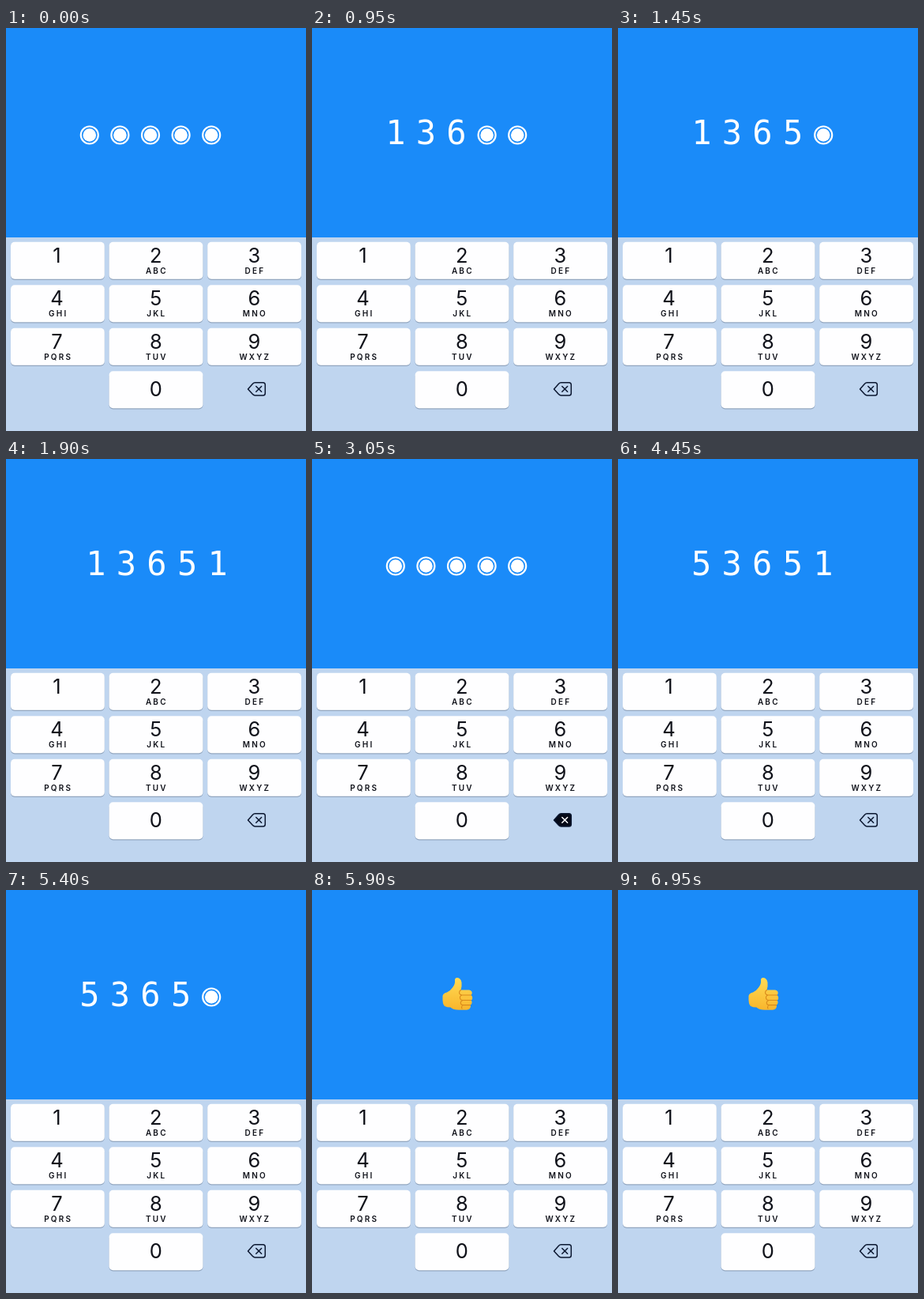
Recreate the animation shown at these times as an HTML page. Size 380 by 510 pixels, loop 7000 ms.

```html
<!DOCTYPE html>
<html lang="en">
<head>
<meta charset="utf-8">
<style>
html, body { margin: 0; width: 100%; height: 100%; overflow: hidden; background: #1a8bf9; }
svg { display: block; }
text { text-anchor: middle; }
.key { font: 25.5px Inter, "Liberation Sans", sans-serif; fill: #10121a; }
.sub { font: 600 10px Inter, "Liberation Sans", sans-serif; letter-spacing: 2.2px; fill: #10121a; }
.code text { font: 42px "DejaVu Sans Mono", monospace; fill: #fff; }
</style>
</head>
<body>
<svg width="380" height="510" viewBox="0 0 380 510">
  <defs>
    <linearGradient id="skin" x2="0" y2="1">
      <stop offset="0" stop-color="#ffdb55"/>
      <stop offset="1" stop-color="#f8b52c"/>
    </linearGradient>
  </defs>
  <rect width="380" height="510" fill="#1a8bf9"/>
  <g class="code" id="code"></g>
  <g id="thumb">
    <path fill="url(#skin)" d="M165.5 134 Q166 130.500 171 129.500 Q175 128 178 123.500 Q181.500 119.500 181 114 Q181 111 184 111 Q188.500 111.500 189.500 117 Q190 122 188.500 126.500 L199 126.500 Q202.500 127 202.700 130 Q202.700 132 201.500 133 Q203.500 134.500 203.200 137 Q203 139 201.500 139.500 Q203 141 202.500 143 Q202 145 200.500 145.500 Q201.500 147 200.500 149 Q199.500 151.500 196 151.700 L186 151.700 Q179 151.700 175.500 148.500 Q171 148.500 168 147 Q165 145 165.500 134Z"/>
    <path fill="none" stroke="#d98a1c" stroke-width="1.1" stroke-linecap="round" d="M188.500 126.500 Q186.500 128 186.500 130 Q187 132.800 190 133 H201.500 M190 133 Q187 134 187.500 137 Q188 139.500 191 139.500 H201.500 M191 139.500 Q187.500 141 188.500 144 Q189 145.600 191.500 145.600 H200.500 M191.500 145.600 Q188.500 147.500 190 150"/>
  </g>
  <rect y="265" width="380" height="245" fill="#bfd5ef"/>
  <g id="pad"></g>
  <g id="del" stroke="#0b1730" stroke-width="1.5" stroke-linejoin="round" stroke-linecap="round">
    <path d="M306.500 457 L312.500 450.200 Q313.800 448.800 315.500 448.800 H325.500 Q328.300 448.800 328.300 451.600 V462.200 Q328.300 465 325.500 465 H315.500 Q313.800 465 312.500 463.600Z"/>
    <path id="cross" d="M316.800 453.500 l6.800 6.800 m0 -6.800 l-6.800 6.800"/>
  </g>
</svg>
<script>
const $ = id => document.getElementById(id);
const LOOP = 7000, SHAKE = 400, SUCCESS = 5750;

// [key, pressed, released]; digits land on release, deletion on press
const taps = [
  ["1", 50, 200], ["3", 600, 700], ["6", 850, 950], ["5", 1100, 1200], ["1", 1500, 1650],
  ["<", 2200, 2300], ["<", 2350, 2450], ["<", 2500, 2600], ["<", 2650, 2750], ["<", 2950, 3100],
  ["5", 3200, 3300], ["3", 3450, 3550], ["6", 3650, 3750], ["5", 3850, 4000], ["1", 4200, 4350],
  ["<", 5000, 5100], ["9", 5550, 5650]
];
const shakes = [1650, 4350];

const letters = ["", "ABC", "DEF", "GHI", "JKL", "MNO", "PQRS", "TUV", "WXYZ"];
const caps = {};
function addKey(label, col, row, sub = "") {
  const x = 6 + col * 124.6, y = 270.7 + row * 54.5, mid = x + 59.2;
  $("pad").insertAdjacentHTML("beforeend",
    `<rect x="${x}" y="${y + 1.2}" width="118.800" height="47" rx="5" fill="#92a6bf"/>
     <rect id="k${label}" x="${x}" y="${y}" width="118.800" height="47" rx="5"/>
     <text class="key" x="${mid - (col ? 0 : 0.8)}" y="${y + 25.8}">${label}</text>
     <text class="sub" x="${mid + 1}" y="${y + 39.8}">${sub}</text>`);
  caps[label] = $("k" + label);
}
letters.forEach((sub, i) => addKey(String(i + 1), i % 3, Math.floor(i / 3), sub));
addKey("0", 1, 3);
// the bottom digit sits in the middle of its key
caps["0"].nextElementSibling.setAttribute("y", 466.3);

const slots = [0, 1, 2, 3, 4].map(i => {
  const g = document.createElementNS("http://www.w3.org/2000/svg", "g");
  g.setAttribute("transform", `translate(${105.8 + i * 38.6} 0)`);
  g.innerHTML = `<text y="147"></text><g><circle cy="135.500" r="11" fill="none"
    stroke="#fff" stroke-width="2.200"/><circle cy="135.500" r="8.300" fill="#fff"/></g>`;
  $("code").append(g);
  return g;
});

const show = (el, on) => el.setAttribute("visibility", on ? "visible" : "hidden");

function draw(t) {
  let typed = "", held = "";
  for (const [key, down, up] of taps) {
    if (t >= down && t < up) held = key;
    if (key === "<") {
      if (t >= down) typed = typed.slice(0, -1);
    } else if (t >= up) typed += key;
  }
  const done = t >= SUCCESS;
  slots.forEach((slot, i) => {
    const [digit, dot] = slot.children;
    digit.textContent = typed[i] || "";
    show(digit, !done);
    show(dot, !done && !typed[i]);
  });
  show($("thumb"), done);

  const start = shakes.find(s => t >= s && t < s + SHAKE);
  const dx = start === undefined ? 0 : 8 * Math.sin((t - start) / SHAKE * 4 * Math.PI);
  $("code").setAttribute("transform", `translate(${dx} 0)`);

  for (const key in caps) caps[key].setAttribute("fill", key === held ? "#9bc4ea" : "#fefeff");
  $("del").setAttribute("fill", held === "<" ? "#050a18" : "none");
  $("cross").setAttribute("stroke", held === "<" ? "#fff" : "#0b1730");
}

const begin = performance.now();
function tick() {
  draw((performance.now() - begin) % LOOP);
  requestAnimationFrame(tick);
}
tick();
</script>
</body>
</html>
```
